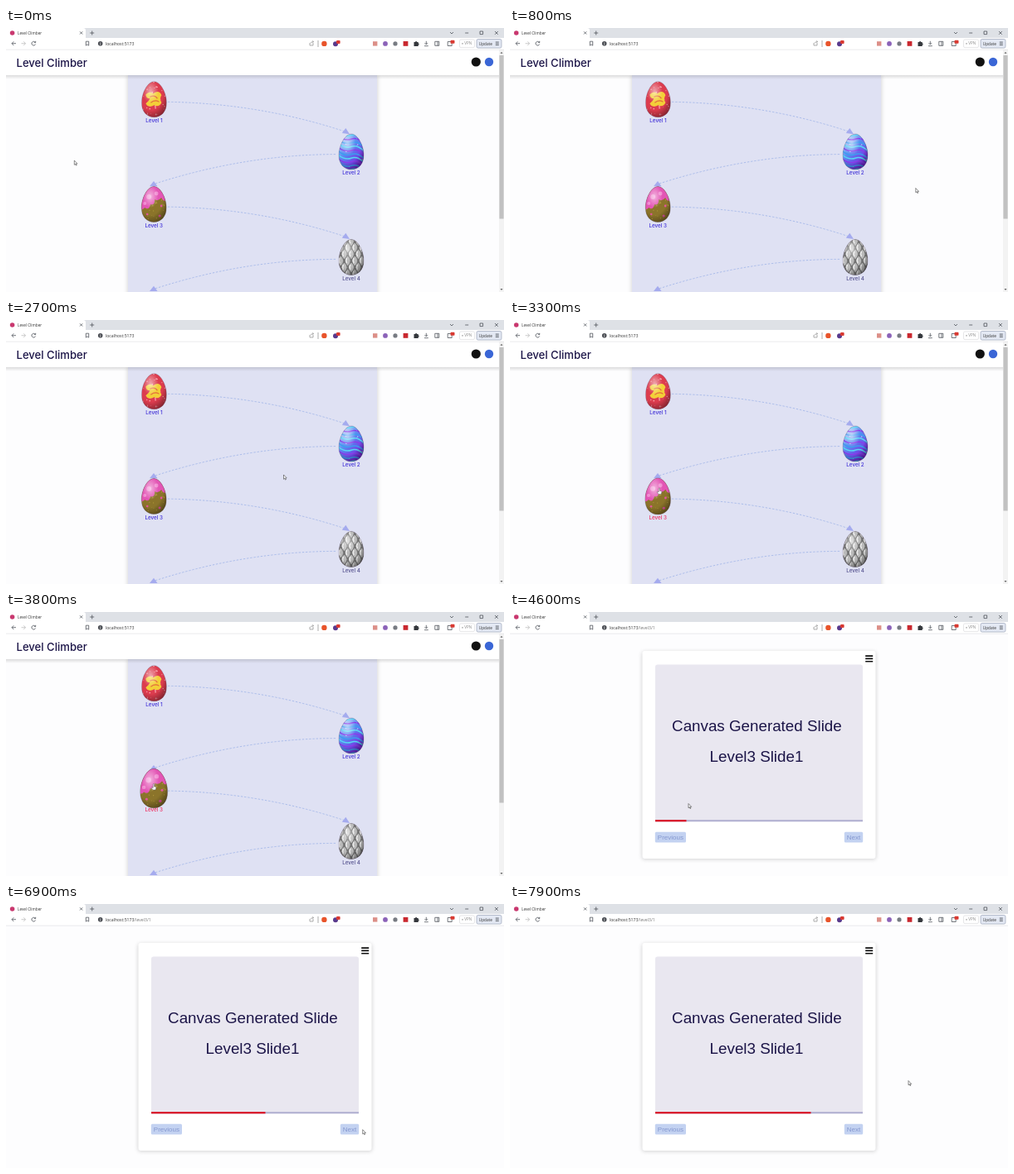
An HTML page that plays this animation: 600x319 px, repeating every 8 s.

```html
<!DOCTYPE html>
<html lang="en">
<head>
<meta charset="utf-8">
<title>Level Climber</title>
<style>
html, body { margin: 0; width: 100%; height: 100%; overflow: hidden; background: #fdfdfe; }
svg { display: block; width: 100vw; height: 100vh; }
.ui { font-family: "Open Sans", "Noto Sans", sans-serif; }
.brand { font-family: Inter, "Open Sans", sans-serif; font-weight: 500; }
.slide { font-family: "Liberation Sans", Arial, sans-serif; }
.line { fill: none; stroke: #50555c; stroke-width: .8; }
</style>
</head>
<body>
<svg viewBox="0 0 600 319" xmlns="http://www.w3.org/2000/svg">
<defs>
  <path id="shell" d="M0-21.5C8-21.5 15-7 15 4C15 15 8.5 21.5 0 21.5S-15 15-15 4C-15-7-8-21.5 0-21.5Z"/>
  <clipPath id="eggClip"><use href="#shell"/></clipPath>
  <radialGradient id="shade" cx=".36" cy=".28" r=".8">
    <stop offset="0" stop-color="#fff" stop-opacity=".55"/>
    <stop offset=".4" stop-color="#fff" stop-opacity="0"/>
    <stop offset=".65" stop-color="#000" stop-opacity="0"/>
    <stop offset="1" stop-color="#000" stop-opacity=".42"/>
  </radialGradient>
  <linearGradient id="violet" x2=".8" y2="1">
    <stop offset="0" stop-color="#d9e6fb"/><stop offset=".45" stop-color="#5b8cf0"/><stop offset="1" stop-color="#7a14dc"/>
  </linearGradient>
  <linearGradient id="below" x2="0" y2="1">
    <stop offset="0" stop-color="#000" stop-opacity=".13"/><stop offset="1" stop-color="#000" stop-opacity="0"/>
  </linearGradient>
  <filter id="soft" x="-10%" y="-10%" width="120%" height="120%"><feGaussianBlur stdDeviation="2.5"/></filter>
</defs>
<rect width="600" height="319" fill="#fdfdfe"/>

<g id="map">
  <rect x="146" y="57" width="302" height="270" fill="#000" opacity=".14" filter="url(#soft)"/>
  <rect x="147" y="57" width="300" height="262" fill="#dfe1f3"/>
  <g id="arrows" fill="none" stroke="#9db3e8" stroke-width=".8" stroke-dasharray="2.4 1.8"/>
  <g id="heads" fill="#a5abee"/>
  <g id="eggs"></g>
  <rect y="57" width="594" height="5" fill="url(#below)"/>
  <rect y="26" width="594" height="31" fill="#fff"/>
  <text class="brand" x="12.5" y="46.7" font-size="13.1" fill="#1c1548">Level Climber</text>
  <circle cx="566.3" cy="41" r="5.6" fill="#111"/>
  <circle cx="582" cy="41" r="5.2" fill="#3a66d6"/>
  <rect x="594" y="26" width="6" height="293" fill="#f3f3f3"/>
  <rect x="594.4" y="33" width="5.2" height="197.5" fill="#c2c2c2"/>
  <path d="M595.5 30.8L597 28.8L598.5 30.8ZM595.5 315L597 317L598.5 315Z" fill="#666"/>
</g>

<g id="lesson">
  <rect x="159" y="48" width="282" height="251" rx="3" fill="#000" opacity=".17" filter="url(#soft)"/>
  <rect x="159.5" y="47" width="281" height="251" rx="3" fill="#fff"/>
  <path d="M428.2 53.1h9M428.2 56.4h9M428.2 59.7h9" stroke="#111" stroke-width="1.6"/>
  <path d="M175 251.5V66.5a3 3 0 0 1 3-3h244a3 3 0 0 1 3 3V251.5Z" fill="#e9e7f0"/>
  <g class="slide" font-size="18.8" fill="#1c1548" text-anchor="middle">
    <text x="297.4" y="143.6">Canvas Generated Slide</text>
    <text x="297" y="181">Level3 Slide1</text>
  </g>
  <rect x="175" y="251.2" width="250" height="2.1" fill="#b0afd0"/>
  <rect id="bar" x="175" y="251.2" height="2.1" fill="#dc0f1f"/>
  <g fill="#c3d2f1">
    <rect x="174.8" y="265.8" width="37.2" height="12.7" rx="1.6"/>
    <rect x="402.8" y="265.8" width="22.4" height="12.7" rx="1.6"/>
  </g>
  <g class="slide" font-size="8" fill="#8497cf" text-anchor="middle">
    <text x="193.4" y="275">Previous</text>
    <text x="414" y="275">Next</text>
  </g>
</g>

<g id="browser" class="ui">
  <rect width="600" height="12.5" fill="#dee1e6"/>
  <path d="M0 0H93a3 3 0 0 1 3 3V12.5H0Z" fill="#fff"/>
  <rect y="12" width="600" height="14" fill="#fff"/>
  <rect y="25.8" width="600" height=".6" fill="#dcdde0"/>
  <circle cx="7.6" cy="6" r="2.8" fill="#c9386f"/>
  <text x="14" y="7.8" font-size="4.65" fill="#333">Level Climber</text>
  <path class="line" d="M89 4.3l3.2 3.2m0-3.2l-3.2 3.2M101.2 6h5m-2.5-2.5v5M535 5l2 2 2-2M553.2 6h4M571 4h3.6v3.6H571ZM589 4l3.8 3.8m0-3.8l-3.8 3.8"/>
  <path class="line" d="M12 18.7H7m2.3-2.4L7 18.7l2.3 2.4M35.3 17.3a2.4 2.4 0 1 0 .3 2.2M35.7 15.8v1.8h-1.8M96.3 16.2h3.4v5l-1.7-1.4-1.7 1.4Z"/>
  <path class="line" style="stroke:#bbb" d="M18.5 18.7h5m-2.3-2.4l2.3 2.4-2.3 2.4"/>
  <circle cx="113.7" cy="18.8" r="2.8" fill="#4c4f55"/>
  <path d="M113.7 17.1v.6m0 .7v2" stroke="#fff" stroke-width=".7"/>
  <text x="120" y="20.6" font-size="5.1" fill="#333">localhost:5173<tspan id="route" fill="#777">/level3/1</tspan></text>
  <path class="line" style="stroke:#999" d="M366 18v3h4v-3M367 18.5q.5-2 3.5-2m-1.2-1.3l1.4 1.3-1.4 1.3M376 15v8"/>
  <circle cx="383.4" cy="18.9" r="3.2" fill="#e8542b"/>
  <circle cx="397" cy="19.2" r="3" fill="#5a3a8c"/>
  <rect x="398" y="15" width="4.6" height="4" rx="1" fill="#d93a32"/>
  <rect x="442" y="16.2" width="5.4" height="5.4" fill="#dc8f88"/>
  <circle cx="457" cy="18.9" r="2.9" fill="#8b62b8"/>
  <circle cx="469" cy="18.9" r="2.6" fill="#777b82"/>
  <rect x="478.6" y="16" width="5.8" height="5.8" fill="#c9282f"/>
  <path d="M491.5 17h1.6a1 1 0 0 1 2 0h1.6v1.6a1 1 0 0 1 0 2v1.4h-5.2Z" fill="#34373c"/>
  <path class="line" d="M506.3 15.8v4m-1.8-1.7l1.8 1.8 1.8-1.8M504 21.7h4.8M516.8 16.3h5v5h-5ZM520 16.3v5"/>
  <path class="line" d="M532.2 16.5h5v5h-5Z"/>
  <rect x="535.5" y="14.8" width="5" height="4" rx="1" fill="#d93a32"/>
  <rect x="546.5" y="14" width="18" height="9.6" rx="1.6" fill="#fff" stroke="#d5d6d9" stroke-width=".6"/>
  <circle cx="550" cy="18.8" r=".9" fill="#aaa"/>
  <text x="552.3" y="20.4" font-size="4.5" fill="#888">VPN</text>
  <rect x="567" y="13.5" width="30" height="10.6" rx="1.8" fill="#e3e8f3" stroke="#8c96ad" stroke-width=".6"/>
  <text x="569.8" y="20.5" font-size="4.7" fill="#333">Update</text>
  <path class="line" d="M589.8 17h4m-4 1.8h4m-4 1.8h4"/>
</g>

<path id="pointer" d="M0 0V5.3L1.2 4.2L2 6.1L2.9 5.7L2.1 3.9H3.7Z" fill="#fff" stroke="#333" stroke-width=".55"/>
<path id="hand" d="M-.7-3.4a.7.7 0 0 1 1.4 0V-.8L2.6-.4Q3.2-.2 3 .8L2.4 3.2H-1L-2.8.6Q-2.4-.2-1.4.4L-.7.9Z" fill="#fff" stroke="#444" stroke-width=".45"/>
</svg>
<script>
const $ = id => document.getElementById(id);

function random(seed) {
  return () => (seed = (seed * 16807) % 2147483647) / 2147483647;
}

function dots(seed, count, color, size) {
  const next = random(seed);
  return Array.from({ length: count }, () =>
    `<circle cx="${next() * 30 - 15}" cy="${next() * 43 - 21}" r="${size * (.5 + next())}" fill="${color}"/>`).join("");
}

const fill = color => `<rect x="-16" y="-22" width="32" height="44" fill="${color}"/>`;

function waves() {
  let out = "";
  for (let i = 0; i < 11; i++) {
    const y = -20 + i * 4.6;
    const color = ["#55d8f4", "#8a3bea", "#3c9df0"][i % 3];
    out += `<path d="M-17 ${y - 5}Q-8 ${y + 3} 0 ${y}T17 ${y + 7}" fill="none" stroke="${color}" stroke-width="1.5"/>`;
  }
  return out;
}

function scales() {
  let out = "";
  for (let row = 0; row < 6; row++)
    for (let col = -2; col < 3; col++) {
      const x = col * 8.5 + (row % 2) * 4.2, y = -20 + row * 8;
      out += `<path d="M${x} ${y - 6}Q${x + 7} ${y} ${x} ${y + 7}Q${x - 7} ${y} ${x} ${y - 6}Z" fill="#b9b9b9" stroke="#666" stroke-width=".7"/>
        <path d="M${x - 1} ${y - 3}q-2 3 0 6" fill="none" stroke="#ededed" stroke-width="1.4"/>`;
    }
  return out;
}

const skins = [
  fill("#dc3c4e") + dots(7, 45, "#f59aa4", .7) +
    `<path d="M-10-6Q-5-11-1-7Q6-12 9-5Q6-1 9 4Q6 10 0 7Q-7 11-10 5Q-6 2-5-1Q-10-1-10-6Z" fill="#f3cf38"/>
     <path d="M-5-3Q1-6 4-1M-4 4Q1 0 6 3" fill="none" stroke="#e36b3a" stroke-width="1.2"/>`,
  fill("url(#violet)") + waves() + dots(19, 16, "#e5f6ff", .4),
  fill("#8b742a") + dots(31, 50, "#b29a3c", .6) +
    `<path d="M-17-22H17V-7Q12-1 9-8Q5-3 1-6Q1 2-4 0Q-6 8-11 4Q-14 8-17 4Z" fill="#e355b5"/>
     <g fill="#f08ad0"><circle cx="-6" cy="-9" r="3"/><circle cx="3" cy="-13" r="2.4"/><circle cx="-11" cy="-1" r="2"/></g>
     <g fill="#e0559c"><circle cx="7" cy="14" r="1.6"/><circle cx="-8" cy="12" r="1.3"/><circle cx="9" cy="2" r="1.4"/></g>`,
  fill("#777") + scales()
];
const places = [[178.4, 86.2], [416, 149.6], [178.2, 213], [416, 277]];

$("eggs").innerHTML = skins.map((skin, i) => {
  const [x, y] = places[i];
  return `<g id="egg${i}" transform="translate(${x} ${y})"><g clip-path="url(#eggClip)">${skin}</g>
    <use href="#shell" fill="url(#shade)" stroke="#4a3550" stroke-opacity=".5" stroke-width=".5"/></g>
    <text id="label${i}" class="brand" x="${x}" y="${y + 27.6}" font-size="6.3" text-anchor="middle"
      fill="${i === 3 ? "#55528f" : "#4030d8"}">Level ${i + 1}</text>`;
}).join("");

for (const dy of [0, 126.8]) {
  $("arrows").innerHTML += `<path d="M195 ${89.3 + dy}Q305 ${91 + dy} 408 ${125 + dy}"/>
    <path d="M397 ${152.6 + dy}Q288 ${153 + dy} 180 ${188 + dy}"/>`;
  $("heads").innerHTML += `<path d="M404.8 ${127 + dy}L409.3 ${121 + dy}L414 ${128.2 + dy}Z"/>
    <path d="M173 ${191.2 + dy}L178 ${185 + dy}L182.5 ${191.2 + dy}Z"/>`;
}

// time, x, y
const track = [
  [0, 82.3, 160], [100, 84, 160], [900, 507, 195], [2150, 507, 195], [2700, 334.5, 187],
  [3250, 180, 207], [3600, 177.5, 211], [3900, 178, 212], [4600, 215, 231.5],
  [5500, 402, 272], [6000, 427.8, 278], [6400, 426, 281], [7000, 430, 272],
  [7500, 449, 258], [7900, 480, 213.5]
];
const HOVER = 3200, OPEN = 3900, STEP = 280, LOOP = 8000;
const clamp = v => Math.max(0, Math.min(1, v));
const ease = v => v * v * (3 - 2 * v);

function cursorAt(t) {
  const i = track.findIndex(k => k[0] > t);
  if (i < 0) return track[track.length - 1].slice(1);
  const [a, b] = [track[i - 1], track[i]];
  const p = ease((t - a[0]) / (b[0] - a[0]));
  return [a[1] + (b[1] - a[1]) * p, a[2] + (b[2] - a[2]) * p];
}

const show = (id, on) => $(id).setAttribute("display", on ? "inline" : "none");

function render(t) {
  const opened = t >= OPEN, hovering = t >= HOVER && !opened;
  show("map", !opened);
  show("lesson", opened);
  show("route", opened);
  show("pointer", !hovering);
  show("hand", hovering);

  const at = `translate(${cursorAt(t).join(" ")})`;
  $("pointer").setAttribute("transform", at);
  $("hand").setAttribute("transform", at);

  const grow = 1 + .1 * ease(clamp((t - HOVER) / 300));
  $("egg2").setAttribute("transform", `translate(${places[2].join(" ")}) scale(${grow})`);
  $("label2").setAttribute("fill", hovering ? "#ee2f62" : "#4030d8");

  const steps = opened ? Math.floor((t - OPEN) / STEP) + 1 : 0;
  $("bar").setAttribute("width", 12.5 * steps);
}

const start = performance.now();
function tick() {
  const t = (performance.now() - start) % LOOP;
  render(Math.floor(t / 100) * 100);
  requestAnimationFrame(tick);
}
tick();
</script>
</body>
</html>
```
